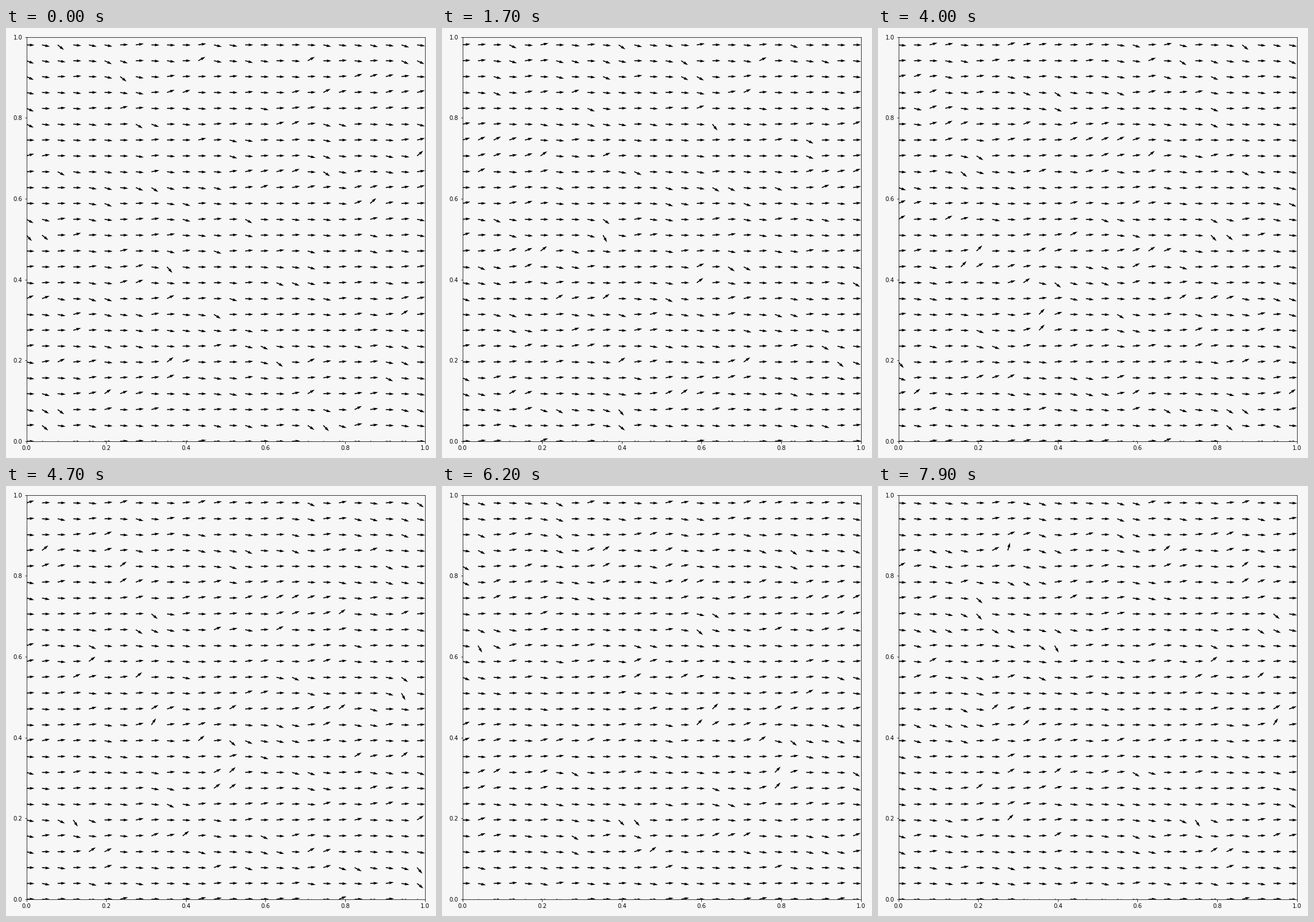
Recreate the animation shown at these times as a matplotlib script. Size 748 px wide and 748 px high, loop 8000 ms.

```python
import numpy as np
import matplotlib.pyplot as plt
from matplotlib.animation import FuncAnimation

SIZE, DPI = 748, 72
FRAMES, INTERVAL = 80, 100
CELLS, SKIP = 51, 2          # field samples per side, one arrow every SKIP samples
LENGTH, WIDTH = 14.0, 1.66   # arrow size in pixels
BACK = "#f7f7f7"

plt.rcParams.update({"font.family": "DejaVu Sans", "font.size": 10})


def smooth(field, axis):
    """Periodic blur along one axis."""
    return (np.roll(field, 1, axis) + 2 * field + np.roll(field, -1, axis)) / 4


def gust_slopes(rows, cols, seed=7):
    """Slopes of a correlated wind field: mostly flat with a few strong gusts."""
    field = np.random.default_rng(seed).standard_normal((rows, cols))
    for axis in (0, 1, 0, 1):
        field = smooth(field, axis)
    field /= field.std()
    return 0.14 * np.sinh(field)


slopes = gust_slopes(CELLS, CELLS + FRAMES)


def wind(i):
    """Unit vectors in view; the frozen field drifts right one sample per step."""
    start = FRAMES - i
    angle = np.arctan(slopes[::SKIP, start:start + CELLS:SKIP])
    return np.cos(angle), np.sin(angle)


fig = plt.figure(figsize=(SIZE / DPI, SIZE / DPI), dpi=DPI, facecolor=BACK)
left, right, top, bottom = 35.5, 728.7, 15.6, 718.9
ax = fig.add_axes([left / SIZE, 1 - bottom / SIZE,
                   (right - left) / SIZE, (bottom - top) / SIZE], facecolor=BACK)
ax.set(xlim=(0, 1), ylim=(0, 1))
ticks = np.linspace(0, 1, 6)
ax.set_xticks(ticks)
ax.set_yticks(ticks)

grid = np.arange(0, CELLS, SKIP) / CELLS
X, Y = np.meshgrid(grid, grid)
arrows = ax.quiver(X, Y, *wind(0), pivot="tail", color="black", units="dots",
                   scale_units="dots", scale=1 / LENGTH, width=WIDTH)


def update(i):
    arrows.set_UVC(*wind(i))
    return arrows,


anim = FuncAnimation(fig, update, frames=FRAMES, interval=INTERVAL,
                     repeat=True, repeat_delay=0, blit=False)
plt.show()
```
